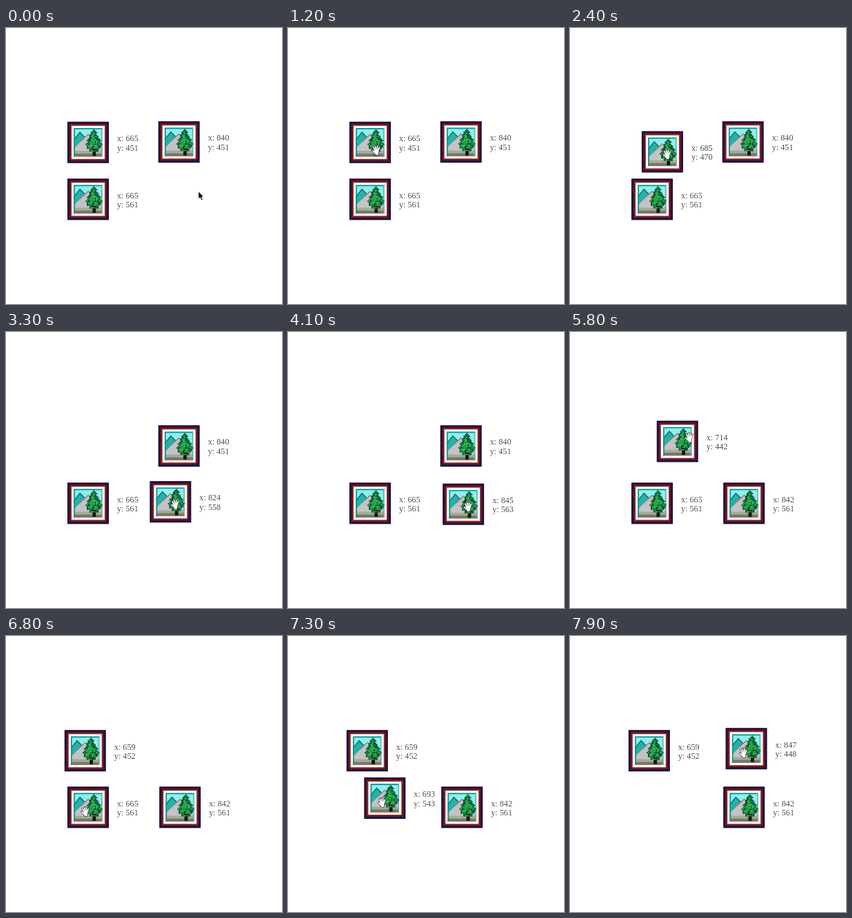
Animation, 400 px wide and 400 px high, one loop 8000 ms. Source, as an HTML page:

```html
<!DOCTYPE html>
<html lang="en">
<head>
<meta charset="utf-8">
<title>Draggable pictures</title>
<style>
  html, body { margin: 0; width: 100%; height: 100%; overflow: hidden; background: #fff; }
  svg { display: block; width: 100vw; height: 100vh; }
  text { font: 12.2px "Liberation Serif", "Times New Roman", serif; fill: #505050; }
  .picture { filter: blur(.45px); }
  #hand use { stroke: #222; stroke-width: 3; }
  #hand use + use { stroke: #fff; stroke-width: 1.8; }
</style>
</head>
<body>
<svg viewBox="0 0 400 400">
  <defs>
    <g id="picture" transform="scale(1.875)">
      <rect width="32" height="32" fill="#130c48"/>
      <rect x="1" y="1" width="30" height="30" fill="#741a1c"/>
      <rect x="1.6" y="1.6" width="28.8" height="28.8" fill="none" stroke="#1c0c34" stroke-width="1.1" stroke-dasharray="1 .8"/>
      <rect x="2.7" y="2.7" width="26.6" height="26.6" fill="none" stroke="#8f2622" stroke-width=".9"/>
      <rect x="3.2" y="3.2" width="25.6" height="25.6" fill="#fff"/>
      <rect x="5" y="5" width="22" height="22" fill="#8ff0ec"/>
      <path d="M5 14L9.7 8.2 16 15V22H5Z" fill="#22b3a8"/>
      <path d="M5 14L9.7 8.2 14 12.6" fill="none" stroke="#186f70" stroke-width=".8"/>
      <path d="M5 23V20.5L16 9.8 27 21V23Z" fill="#c3c3c6"/>
      <path d="M10 15.2L16 9.8 20 14" fill="none" stroke="#77858a" stroke-width=".7"/>
      <rect x="5" y="22.5" width="22" height="4.5" fill="#a6ab9a"/>
      <rect x="5" y="24.7" width="22" height="2.3" fill="#737b66"/>
      <path d="M5.4 27V5.4H27" fill="none" stroke="#168c8c" stroke-width=".9"/>
      <path d="M26.6 5V27" fill="none" stroke="#4cb8b2" stroke-width=".8"/>
      <rect x="19.4" y="21" width="2.6" height="5.4" fill="#101810"/>
      <g id="tree"></g>
    </g>
    <path id="fingers" d="M-1.5 2L-4-3.8M0 2L-1.5-5.4M1.4 2L1.4-5.4M2.4 2L4.2-3.6M-1.6 4.4L-5.2.8M-1.4 2.4H2.2L1.7 6.4H-.6Z"/>
  </defs>
  <g id="items"></g>
  <g id="cursor">
    <path id="arrow" d="M0 0V10.5L2.4 8.4 4.2 12.4 6 11.6 4.3 7.8H7.4Z" stroke="#fff" stroke-width=".5"/>
    <g id="hand" fill="#fff" stroke-linecap="round" stroke-linejoin="round">
      <use href="#fingers"/><use href="#fingers"/>
    </g>
  </g>
</svg>
<script>
const DURATION = 8000, STEP = 100, SIZE = 60, SCALE = .7525;
const byId = id => document.getElementById(id);

// Page coordinates of the pictures and stage position of the cursor at rest.
const homes = [[665, 451.4], [840, 450.6], [665, 561]];
const cursorHome = [279, 237];

// Moves run in order; with an item the cursor drags it, without one it moves freely.
const moves = [
  { start: 100, end: 1000, to: [128, 177] },
  { start: 1300, end: 2000, to: [126, 169] },
  { start: 2070, end: 3700, item: 0, via: [758, 540], to: [852, 568] },
  { start: 3700, end: 4300, item: 0, to: [842, 561] },
  { start: 4400, end: 5000, to: [268, 159] },
  { start: 5100, end: 6200, item: 1, via: [750, 428], to: [659.4, 452] },
  { start: 6250, end: 6750, to: [115, 254] },
  { start: 7100, end: 7900, item: 2, to: [846.5, 448] }
];

const smooth = k => k * k * (3 - 2 * k);
const middle = (a, b) => a.map((v, i) => (v + b[i]) / 2);
const curve = (a, b, c, u) =>
  a.map((v, i) => v * (1 - u) ** 2 + 2 * u * (1 - u) * b[i] + c[i] * u * u);

function stateAt(t) {
  const positions = [...homes];
  let cursor = cursorHome;
  for (const { start, end, item, via, to } of moves) {
    if (t < start) break;
    const from = item === undefined ? cursor : positions[item];
    const u = smooth(Math.min(1, (t - start) / (end - start)));
    const now = curve(from, via || middle(from, to), to, u);
    if (item === undefined) cursor = now;
    else {
      cursor = cursor.map((v, i) => v + (now[i] - from[i]) * SCALE);
      positions[item] = now;
    }
  }
  return { positions, cursor };
}

// Foliage: tiers of one-unit cells, dark at the rim and speckled inside.
function growTree() {
  let seed = 11, cells = "";
  const random = () => (seed = seed * 16807 % 2147483647) / 2147483647;
  for (let y = 6; y < 23; y++) {
    const spread = y < 18 ? .8 + (y - 6) * .48 : 6.4 - (y - 17) * .7;
    const half = spread + (y % 3 - 1) * .5;
    for (let x = Math.round(20.2 - half); x < 20.2 + half; x++) {
      const rim = Math.abs(x + .5 - 20.2) > half - 1.1;
      const roll = random();
      const fill = rim ? "#06492a" : roll < .2 ? "#042a12" : roll < .55 ? "#087a34" : "#14b040";
      cells += `<rect x="${x}" y="${y}" width="1.05" height="1.05" fill="${fill}"/>`;
    }
  }
  byId("tree").innerHTML = cells;
}

const toStage = ([x, y]) => [89 + (x - 665) * SCALE, 135.5 + (y - 451) * SCALE];
const place = (el, [x, y]) => el.setAttribute("transform", `translate(${x.toFixed(2)} ${y.toFixed(2)})`);

growTree();
byId("items").innerHTML = homes.map(() =>
  '<g><use class="picture" href="#picture"/><text x="72" y="28.3"/><text x="72" y="41.8"/></g>').join("");
const groups = [...byId("items").children];

function render(t) {
  const { positions, cursor } = stateAt(t);
  const corners = positions.map(toStage);
  groups.forEach((group, i) => {
    place(group, corners[i]);
    group.querySelectorAll("text").forEach((label, axis) => {
      label.textContent = "xy"[axis] + ": " + Math.round(positions[i][axis]);
    });
  });
  const hovering = corners.some(corner =>
    corner.every((c, axis) => cursor[axis] >= c && cursor[axis] <= c + SIZE));
  place(byId("cursor"), cursor);
  byId("hand").style.display = hovering ? "" : "none";
  byId("arrow").style.display = hovering ? "none" : "";
}

const started = performance.now();
function tick() {
  const elapsed = (performance.now() - started) % DURATION;
  render(Math.floor(elapsed / STEP) * STEP);
  requestAnimationFrame(tick);
}
tick();
</script>
</body>
</html>
```
